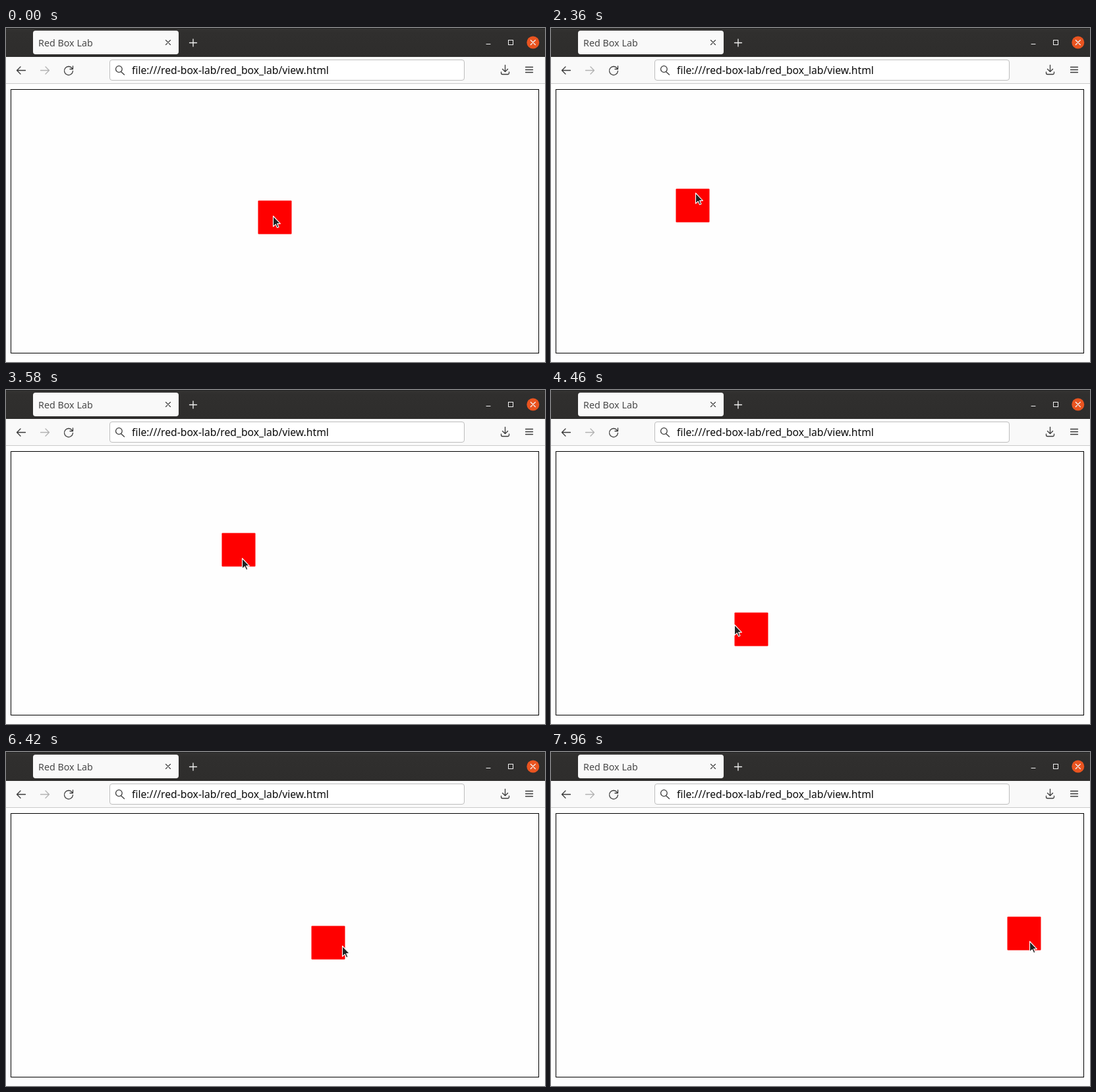
An HTML page for the animation above (8 s loop, 818 by 508 pixels).

```html
<!DOCTYPE html>
<html lang="en">
<head>
<meta charset="utf-8">
<title>Drag demo</title>
<style>
  html, body { margin: 0; width: 100%; height: 100%; overflow: hidden; background: #fefefe; }
  svg { display: block; width: 818px; height: 508px; }
  text { font-family: "Noto Sans", "Open Sans", sans-serif; }
  .icon { fill: none; stroke: #3a3a3a; stroke-width: 1.3; stroke-linecap: round; stroke-linejoin: round; }
  .thin { stroke-width: 1.1; }
  .light { stroke: #f2f2f2; }
  .faint { stroke: #b2b2b2; }
</style>
</head>
<body>
<svg viewBox="0 0 818 508">
  <defs>
    <linearGradient id="bar" x2="0" y2="1">
      <stop offset="0" stop-color="#353433"/>
      <stop offset=".15" stop-color="#302f2e"/>
      <stop offset="1" stop-color="#2e2d2c"/>
    </linearGradient>
  </defs>
  <rect width="818" height="508" fill="#fefefe"/>

  <!-- Title bar -->
  <rect width="818" height="44" fill="url(#bar)"/>
  <rect width="818" height="1" fill="#222"/>
  <rect x="41" y="4" width="221" height="36" rx="4" fill="#f9f9f9"/>
  <text x="49" y="28" font-size="14.3" fill="#484848">Red Box Lab</text>
  <path class="icon thin" d="M242.5 18.5l7 7m0-7l-7 7"/>
  <path class="icon light" d="M278.5 22.5h11m-5.5-5.5v11"/>
  <path class="icon light thin" d="M729 24.5h6"/>
  <rect x="762.5" y="18.5" width="7" height="7" fill="none" stroke="#f2f2f2"/>
  <circle cx="799.8" cy="22" r="9.5" fill="#e95420"/>
  <path class="icon light" d="M796.3 18.5l7 7m0-7l-7 7"/>

  <!-- Toolbar -->
  <rect y="44" width="818" height="40" fill="#f9f9f9"/>
  <rect y="84" width="818" height="1" fill="#cbcbcb"/>
  <path class="icon" d="M29.5 64.5h-13m5.5-5.5l-5.5 5.5l5.5 5.5"/>
  <path class="icon faint" d="M52.5 64.5h13m-5.5-5.5l5.5 5.5l-5.5 5.5"/>
  <path class="icon" d="M100.5 61.5a6.5 6.5 0 1 0 1 4M101.5 58v4.5h-4.5"/>
  <rect x="157.5" y="48.5" width="538" height="31" rx="3.5" fill="#fff" stroke="#bdbdbd"/>
  <path class="icon" d="M174.5 66.5l5 4.5M176.2 62.5a4.8 4.8 0 1 0-9.6 0a4.8 4.8 0 1 0 9.6 0"/>
  <text x="191" y="70" font-size="15.7" fill="#0c0c0c">file:///red-box-lab/red_box_lab/view.html</text>
  <path class="icon" d="M757.5 56.5v10m-4-4l4 4l4-4M751.5 67v1.5q0 2 2 2h8q2 0 2-2v-1.5"/>
  <path class="icon" d="M788.5 59.5h11m-11 4h11m-11 4h11"/>

  <!-- Page -->
  <rect x="7.5" y="93.5" width="801" height="401" fill="#fefefe" stroke="#000"/>
  <rect id="box" x="-.5" y="-.5" width="51" height="51" rx="1" fill="#f00"/>
  <path id="pointer" d="M.5 0V16L4.2 12.6L6.6 17.8L9 16.7L6.7 11.6H11.4Z"
        fill="#222" stroke="#fff" stroke-width="1.1" stroke-linejoin="round"/>
</svg>
<script>
  const LOOP = 8000, START = 500, LAST_STEP = 161;
  const LAG = 2.5;                  // steps the box trails behind the pointer
  const GRIP = { x: 22.5, y: 23 };  // where the pointer holds the box

  // Turning points of the drag: step, x, y
  const route = [
    [1, 383, 263], [12, 354, 300], [21, 304, 321], [24, 270, 325],
    [35, 205, 300], [41, 190, 245], [53, 240, 180], [66, 328, 218],
    [76, 335, 293], [84, 295, 339], [95, 198, 308], [101, 177, 265],
    [105, 195, 227], [111, 270, 187], [125, 425, 255], [128, 464, 265],
    [137, 541, 284], [152, 657, 239], [161, 693, 251], [164, 705, 268]
  ];
  const end = route.length - 1;

  const box = document.getElementById("box");
  const pointer = document.getElementById("pointer");

  // Two short holds and one long hold repeat every 140 ms.
  function stepAt(time) {
    if (time < START) return -1;
    const t = time - START, rest = t % 140;
    const step = 3 * Math.floor(t / 140) + (rest < 20 ? 0 : rest < 40 ? 1 : 2);
    return Math.min(step, LAST_STEP);
  }

  function slope(i, axis) {
    if (i === 0) return 0;
    const a = route[i - 1], b = route[Math.min(i + 1, end)];
    return (b[axis] - a[axis]) / (b[0] - a[0]);
  }

  // Smooth curve through the route
  function along(step, axis) {
    const s = Math.max(step, route[0][0]);
    let i = 0;
    while (i < end - 1 && route[i + 1][0] <= s) i++;
    const a = route[i], b = route[i + 1], span = b[0] - a[0];
    const u = (s - a[0]) / span, v = 1 - u;
    return v * v * ((1 + 2 * u) * a[axis] + u * span * slope(i, axis))
         + u * u * ((3 - 2 * u) * b[axis] - v * span * slope(i + 1, axis));
  }

  function place(node, step, dx = 0, dy = 0) {
    const x = Math.round(along(step, 1) + dx), y = Math.round(along(step, 2) + dy);
    node.setAttribute("transform", `translate(${x} ${y})`);
  }

  function draw() {
    const step = stepAt(performance.now() % LOOP);
    place(box, step);
    place(pointer, step + LAG, GRIP.x, GRIP.y);
    requestAnimationFrame(draw);
  }
  draw();
</script>
</body>
</html>
```
